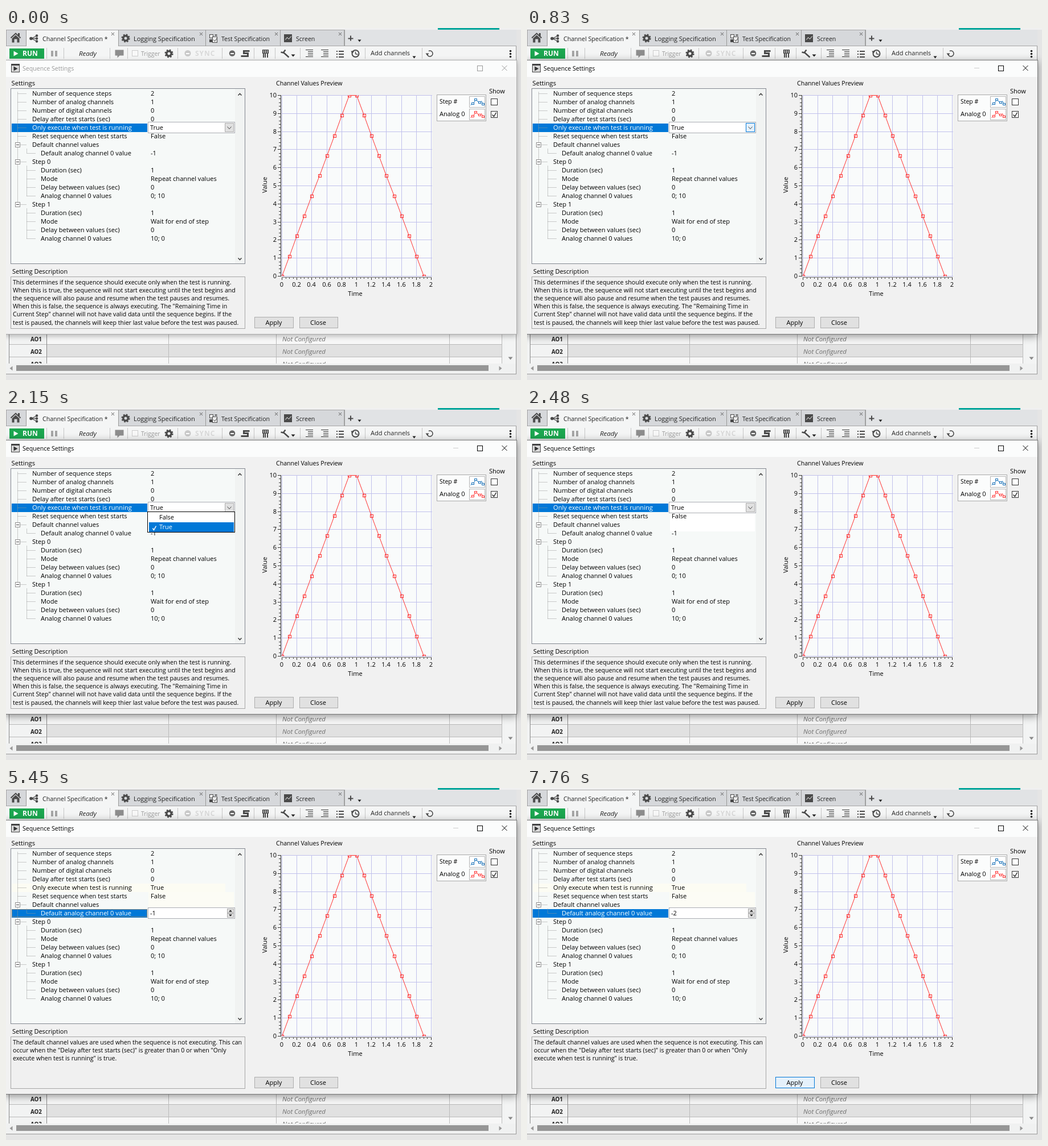
Recreate the animation shown at these times as an HTML page with a canvas. Size 904 px wide and 619 px high, loop 8000 ms.

```html
<!DOCTYPE html>
<html lang="en">
<head>
<meta charset="utf-8">
<title>Sequence Settings</title>
<style>
html, body { margin: 0; width: 100%; height: 100%; overflow: hidden; background: #e5e5e5; }
canvas { display: block; }
</style>
</head>
<body>
<canvas id="stage" width="904" height="619"></canvas>
<script>
const ctx = document.getElementById('stage').getContext('2d');
const LOOP = 8000;
const BLUE = '#0078d7', DARK = '#4a4a4a', TEXT = '#000';

function rect(x, y, w, h, fill, border) {
  ctx.fillStyle = border || fill;
  ctx.fillRect(x, y, w, h);
  if (border) { ctx.fillStyle = fill; ctx.fillRect(x + 1, y + 1, w - 2, h - 2); }
}
function trace(points) {
  ctx.beginPath();
  for (let i = 0; i < points.length; i += 2) ctx.lineTo(points[i] + .5, points[i + 1] + .5);
}
function line(points, color = DARK, width = 1, dash = []) {
  trace(points);
  ctx.strokeStyle = color; ctx.lineWidth = width;
  ctx.setLineDash(dash); ctx.stroke(); ctx.setLineDash([]);
}
function poly(points, color = DARK) { trace(points); ctx.fillStyle = color; ctx.fill(); }
function circle(x, y, r, color = DARK, width = 0, dash = []) {
  ctx.beginPath(); ctx.arc(x, y, r, 0, 7);
  ctx.fillStyle = ctx.strokeStyle = color;
  ctx.lineWidth = width; ctx.setLineDash(dash);
  width ? ctx.stroke() : ctx.fill();
  ctx.setLineDash([]);
}
function text(str, x, y, { color = TEXT, size = 11, style = '', align = 'left', gap = 0 } = {}) {
  ctx.font = `${style} ${size}px "Open Sans", sans-serif`;
  ctx.fillStyle = color; ctx.textAlign = align;
  ctx.letterSpacing = gap + 'px';
  ctx.fillText(str, x, y);
}
function cross(x, y, r, color, width = 1) {
  line([x - r, y - r, x + r, y + r], color, width);
  line([x - r, y + r, x + r, y - r], color, width);
}
function gear(x, y) {
  circle(x, y, 4.2, DARK, 3.4);
  circle(x, y, 6.4, DARK, 2.4, [2.6, 2.43]);
}
function button(x, y, w, h, hot) { rect(x, y, w, h, hot ? '#e5f1fb' : '#e1e1e1', hot ? BLUE : '#adadad'); }

function drawTabs() {
  rect(0, 0, 896, 32, '#e1e3e5');
  rect(0, 0, 904, 3, '#f0f0f0');
  rect(758, 0, 108, 3, '#00a79d');
  rect(0, 3, 594, 29, '#d6d8db', '#a6a6a6');
  rect(35, 3, 163, 29, '#f4f5f5', '#a6a6a6');
  rect(36, 30, 161, 3, '#f4f5f5');
  rect(197, 31, 699, 1, '#a6a6a6');
  for (const x of [35, 197, 350, 481, 594]) rect(x, 3, 1, 29, '#999');

  line([8, 17, 16.5, 9, 25, 17], DARK, 2);
  rect(21, 9, 3, 5, DARK);
  poly([16.5, 12, 23, 18, 23, 25, 19, 25, 19, 19, 14, 19, 14, 25, 10, 25, 10, 18]);
  line([54, 13, 44, 18, 54, 23], DARK, 1.3);
  line([44, 18, 54, 18], DARK, 1.3);
  circle(44, 18.5, 2.8);
  for (const y of [13.5, 18.5, 23.5]) circle(54, y, 2.2);
  gear(210, 18);
  rect(357, 11, 7, 7, '#eee', DARK);
  rect(357, 20, 5, 5, DARK);
  rect(362, 15, 9, 11, '#eee', DARK);
  line([366, 12, 370, 12], DARK, 2);
  line([364, 20, 366, 23, 370, 17]);
  rect(488, 11, 14, 14, DARK);
  line([490, 20, 493, 16, 496, 19, 500, 14], '#fff');

  [['Channel Specification *', 64, 187, 10.6], ['Logging Specification', 224, 342, 11],
   ['Test Specification', 378, 474, 10.6], ['Screen', 509, 586, 10.6]].forEach(([name, x, close, size]) => {
    text(name, x, 22.5, { size, color: '#222' });
    cross(close, 10, 2.5, '#555');
  });
  line([600, 18, 609, 18], DARK, 2);
  line([604.5, 13, 604.5, 22], DARK, 2);
  poly([617, 20, 623, 20, 620, 24], '#222');
}

function drawToolbar() {
  rect(0, 32, 895, 25, '#f4f5f5');
  for (const x of [71, 101, 182, 213, 301, 379, 435, 472, 516, 630, 730]) rect(x, 35, 1, 19, '#c6c6c6');
  rect(6, 36, 61, 18, '#1ba64f');
  poly([13, 40, 13, 49, 21, 44.5], '#fff');
  text('RUN', 29, 49, { style: 'bold', size: 12, color: '#fff' });
  rect(79, 40, 4, 10, '#a5a5a5');
  rect(86, 40, 4, 10, '#a5a5a5');
  text('Ready', 128, 49, { style: 'italic', size: 11.6, color: '#222' });
  poly([191, 38, 206, 38, 206, 48, 199, 48, 195, 52, 195, 48, 191, 48], '#8d8d8d');
  rect(221, 39, 11, 11, '#f8f8f8', '#ccc');
  text('Trigger', 237, 49, { size: 10.4, color: '#999' });
  gear(286, 45);
  circle(319, 44.5, 5.5, '#c9c9c9');
  rect(316, 44, 6, 2, '#fff');
  text('SYNC', 332, 49, { size: 12, gap: 1, style: 'bold', color: '#d9d9d9' });
  circle(397, 44.5, 5.3, '#666');
  rect(394, 44, 6, 2, '#fff');
  line([427, 40, 417, 40, 417, 44, 424, 44, 424, 49, 412, 49], DARK, 3);
  rect(450, 38, 11, 7, DARK);
  for (const x of [452, 455, 458]) rect(x, 39, 1, 5, '#eee');
  for (const x of [451, 454, 458]) rect(x, 45, 2, 7, DARK);
  line([486, 42, 496, 51], DARK, 2.4);
  line([482, 42, 486, 43, 490, 38], DARK, 2.4);
  poly([500, 46, 507, 46, 503.5, 50], '#222');
  for (let i = 0; i < 5; i++) {
    const inset = i % 4 ? 4 : 0;
    rect(526 + inset, 38 + i * 3, 13 - inset, 1, '#333');
    rect(553 + inset, 38 + i * 3, 13 - inset, 1, '#333');
  }
  for (let y = 40; y < 52; y += 5) { rect(580, y, 2, 2, DARK); rect(584, y, 9, 2, DARK); }
  circle(613.5, 45, 6, DARK, 2);
  line([613, 41, 613, 45, 617, 46], DARK, 1.4);
  poly([605, 40, 611, 40, 607, 45]);
  text('Add channels', 640, 48, { color: '#222' });
  poly([713, 49, 719, 49, 716, 53], '#222');
  ctx.beginPath(); ctx.arc(744, 45, 5, -2, 2.9);
  ctx.lineWidth = 1.5; ctx.strokeStyle = DARK; ctx.stroke();
  poly([736, 44, 742, 44, 739, 48]);
  for (const y of [40, 45, 50]) circle(885.5, y + .5, 1.8, '#222');
}

function drawTable() {
  rect(0, 57, 895, 551, '#f2f3f3');
  ctx.save();
  ctx.beginPath(); ctx.rect(0, 530, 896, 60); ctx.clip();
  for (let i = 0; i < 3; i++) {
    const y = 535 + i * 22;
    rect(6, y, 865, 22, i % 2 ? '#e1e1e1' : '#f7f7f7');
    rect(6, y, 66, 22, '#f2f3f3');
    rect(6, y + 21, 865, 1, '#b9b9b9');
    text('AO' + (i + 1), 43, y + 15.5, { style: 'bold', size: 9.8, color: '#222' });
    text('Not Configured', 485, y + 16, { style: 'italic', size: 11.4, color: '#707070' });
  }
  for (const x of [285, 474, 778, 870]) rect(x, 535, 1, 55, '#bbb');
  rect(5, 535, 1, 55, '#888'); rect(71, 535, 1, 55, '#888');
  ctx.restore();
  rect(876, 535, 19, 55, '#f3f4f4');
  poly([881, 578, 889, 578, 885, 583], '#8a8a8a');
  rect(0, 590, 895, 17, '#f0f1f1');
  rect(18, 593, 829, 10, '#969696');
  poly([11, 594, 11, 602, 6, 598], '#999');
  poly([865, 594, 865, 602, 870, 598], '#999');
  rect(0, 608, 896, 1, '#999');
  rect(895, 3, 1, 606, '#999');
}

function drawFrame(active) {
  ctx.save();
  ctx.shadowColor = active ? 'rgba(0,0,0,.42)' : 'rgba(0,0,0,.26)';
  ctx.shadowBlur = active ? 13 : 9;
  ctx.shadowOffsetY = 3;
  rect(-3, 56, 900, 483, '#f0f0f0');
  ctx.restore();
  rect(-3, 56, 900, 483, '#f1f1f1', active ? '#777' : '#aaa');
  rect(0, 57, 896, 29, '#fbfcfc');
  rect(9, 63, 15, 15, '#d8d8d8', '#444');
  rect(9, 63, 15, 3, '#444');
  poly([13, 67, 13, 75, 20, 71], '#333');
  const color = active ? '#000' : '#999';
  text('Sequence Settings', 29, 75, { size: 10.6, color });
  if (active) rect(785, 70, 9, 1, '#ccc');
  rect(827, 66, 10, 10, '#fbfcfc', color);
  cross(874.5, 70, 4.5, color);
}

const rows = [
  [0, 'Number of sequence steps', '2'], [0, 'Number of analog channels', '1'],
  [0, 'Number of digital channels', '0'], [0, 'Delay after test starts (sec)', '0'],
  [0, 'Only execute when test is running', 'True'], [0, 'Reset sequence when test starts', 'False'],
  [0, 'Default channel values'], [1, 'Default analog channel 0 value', '-1'],
  [0, 'Step 0'], [1, 'Duration (sec)', '1'], [1, 'Mode', 'Repeat channel values'],
  [1, 'Delay between values (sec)', '0'], [1, 'Analog channel 0 values', '0; 10'],
  [0, 'Step 1'], [1, 'Duration (sec)', '1'], [1, 'Mode', 'Wait for end of step'],
  [1, 'Delay between values (sec)', '0'], [1, 'Analog channel 0 values', '10; 0']
];

function drawTree(t) {
  const second = t >= 5450, selected = second ? 7 : 4;
  text('Settings', 9.5, 101, { size: 11.2 });
  rect(8, 106, 412, 309, '#f6f9f8', '#828790');
  rect(402, 107, 17, 307, '#f1f3f2');
  line([407, 118, 410, 115, 413, 118], '#444', 1.6);
  line([407, 404, 410, 407, 413, 404], '#444', 1.6);
  if (second) {
    rect(10, 168, 375, 15, '#fcfcf3');
    rect(250, 183, 150, 28, '#fcfcf5');
  } else if (t >= 2480) rect(251, 184, 149, 33, '#fff');

  const top = 168 + (selected - 4) * 15;
  rect(10, top, 238, 15, BLUE);
  if (second && t < 6770) line([10, top, 247, top, 247, top + 13, 10, top + 13, 10, top], '#e88a30', 1, [1, 1]);

  const dots = (...p) => line(p, '#999', 1, [1, 1]);
  dots(20, 112, 20, 310);
  dots(36, 212, 36, 220); dots(36, 242, 36, 295); dots(36, 317, 36, 370);
  rows.forEach(([level, label, value], i) => {
    const y = 115 + i * 15, x = 20 + level * 16;
    dots(x, y, x + 16, y);
    if (value === undefined) {
      rect(16, y - 4, 9, 9, '#fff', '#919191');
      rect(18, y, 5, 1, '#444');
    } else if (i !== selected) text(value, 254, y + 4, { size: 11.1 });
    text(label, 46 + level * 15, y + 4, { size: 11.1, color: i === selected ? '#fff' : TEXT });
  });
  second ? drawSpinner(t) : drawCombo(t);
}

function drawCombo(t) {
  rect(249, 165, 153, 20, '#fff', '#abadb3');
  text('True', 253, 179);
  button(384, 167, 16, 16, (t >= 500 && t < 1820) || (t >= 2810 && t < 3140));
  line([388, 173, 391.5, 177, 395, 173], '#444');
  if (t < 1160 || t >= 2480) return;
  rect(248, 182, 154, 37, '#fff', '#000');
  const chosen = t < 1820 ? -1 : t < 2150 ? 0 : 1;
  ['False', 'True'].forEach((name, i) => {
    const y = 184 + i * 17, color = i === chosen ? '#fff' : TEXT;
    if (i === chosen) rect(251, y, 149, 17, BLUE);
    text(name, 269, y + 12, { color });
    if (i) line([257, y + 10, 259, y + 13, 263, y + 6], color, 1.5);
  });
}

function drawSpinner(t) {
  rect(249, 210, 153, 20, '#fff', '#abadb3');
  text(t < 6770 ? '-1' : '-2', 253, 224);
  button(388, 212, 12, 8);
  button(388, 220, 12, 8, t >= 6440 && t < 7430);
  poly([390.5, 217, 396.5, 217, 393.5, 214], '#111');
  poly([390.5, 222, 396.5, 222, 393.5, 225], '#111');
}

const runningHelp = [
  'This determines if the sequence should execute only when the test is running.',
  'When this is true, the sequence will not start executing until the test begins and',
  'the sequence will also pause and resume when the test pauses and resumes.',
  'When this is false, the sequence is always executing. The "Remaining Time in',
  'Current Step" channel will not have valid data until the sequence begins. If the',
  'test is paused, the channels will keep thier last value before the test was paused.'
];
const defaultHelp = [
  'The default channel values are used when the sequence is not executing. This can',
  'occur when the "Delay after test starts (sec)" is greater than 0 or when "Only',
  'execute when test is running" is true.'
];

function drawHelp(t) {
  text('Setting Description', 11, 432);
  rect(8, 437, 412, 92, '#f0f0f0', '#a6a6a6');
  (t < 5450 ? runningHelp : defaultHelp).forEach((str, i) =>
    text(str, 12, 451 + i * 14.1, { size: 10.6 }));
}

function drawPlot() {
  const px = v => Math.round(484 + v * 131), py = v => Math.round(436 - v * 31.8);
  text('Channel Values Preview', 474, 101, { size: 10.6 });
  rect(484, 118, 264, 319, '#f9fbfb');
  for (let i = 0; i <= 10; i++) {
    const x = px(i / 5), y = py(i);
    rect(x, 118, 1, 319, '#c1c1ec');
    rect(484, y, 264, 1, '#c1c1ec');
    text(String(i / 5), x, 455, { align: 'center' });
    text(String(i), 475, y + 4, { align: 'right' });
  }
  rect(482, 118, 1, 319, '#333');
  rect(484, 438, 263, 1, '#777');
  for (let i = 0; i <= 50; i++) {
    const len = i % 5 ? 3 : 5;
    rect(482 - len, py(i / 5), len, 1, '#333');
  }
  for (let i = 0; i <= 40; i++) rect(px(i / 20), 439, 1, i % 4 ? 2 : 4, '#333');
  text('Time', 613, 471, { align: 'center' });
  ctx.save();
  ctx.translate(457.5, 276); ctx.rotate(-Math.PI / 2);
  text('Value', 0, 0, { align: 'center' });
  ctx.restore();

  const curve = [];
  for (let i = 0; i < 20; i++) curve.push(px(i / 10), py((i < 10 ? i : 19 - i) * 10 / 9));
  ctx.save();
  ctx.beginPath(); ctx.rect(484, 118, 264, 319); ctx.clip();
  line(curve, '#ff3030');
  for (let i = 0; i < 40; i += 2) ctx.strokeRect(curve[i] - 1.5, curve[i + 1] - 1.5, 5, 5);
  ctx.restore();
}

function drawLegend() {
  text('Show', 848, 115);
  rect(756, 117, 87, 47, '#fbfcfc', '#aaa');
  [['Step #', '#1670b8', 10.5], ['Analog 0', '#ff3030', 11]].forEach(([name, color, size], i) => {
    const y = 120 + i * 22;
    text(name, 761, y + 13, { size });
    rect(813, y, 28, 20, '#fff', '#b5b5b5');
    line([815, y + 15, 819, y + 13, 824, y + 6, 831, y + 11, 834, y + 8, 838, y + 15], color);
    for (const [dx, dy] of [[5, 11], [10, 4], [17, 9], [23, 12]]) rect(812 + dx, y + dy, 5, 4, '#fff', color);
    rect(851, 124 + i * 22, 12, 12, '#fff', '#333');
  });
  line([853, 152, 856, 155, 860, 148], '#222', 1.4);
}

function draw(t) {
  rect(0, 0, 904, 619, '#e5e5e5');
  drawTable();
  drawTabs();
  drawToolbar();
  drawFrame(t >= 830);
  drawTree(t);
  drawHelp(t);
  drawPlot();
  drawLegend();
  button(436, 508, 69, 20, t >= 7760);
  text('Apply', 470, 522, { align: 'center' });
  button(515, 508, 68, 20);
  text('Close', 548, 522, { align: 'center' });
}

const start = performance.now();
function tick() {
  draw((performance.now() - start) % LOOP);
  requestAnimationFrame(tick);
}
tick();
</script>
</body>
</html>
```
